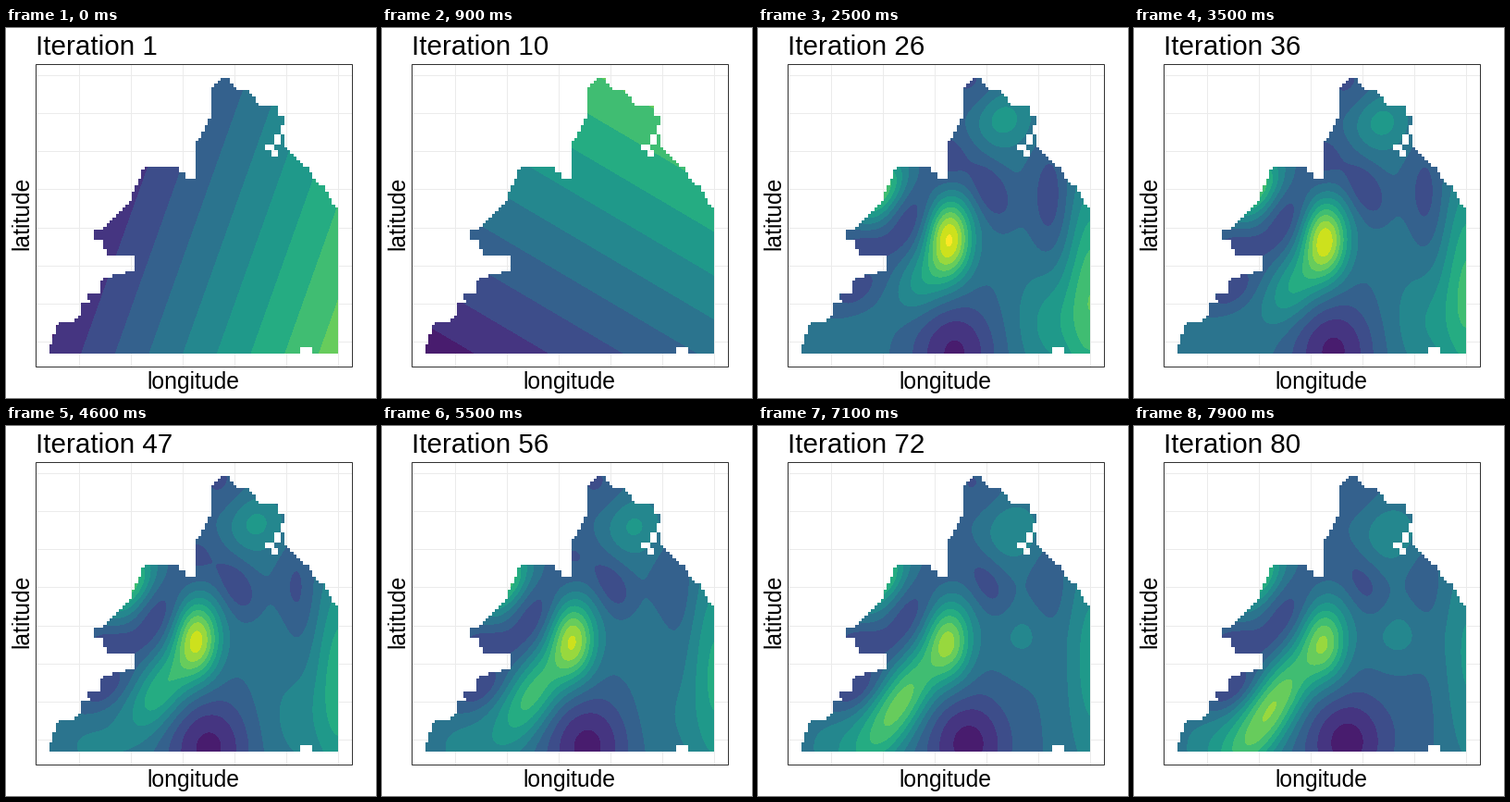
Animation of 400x400 px, one loop 8000 ms. Source, as a matplotlib script:

```python
import numpy as np
import matplotlib.pyplot as plt
from matplotlib.animation import FuncAnimation
from matplotlib.patches import Rectangle
from matplotlib.path import Path

plt.rcParams["font.family"] = ["Liberation Sans", "DejaVu Sans"]

SIZE, DPI, FRAMES = 400, 100, 80
PX = 72 / DPI
LEFT, BOTTOM, CELL = 46.8, 352, 3.43
COLORS = (plt.get_cmap("viridis")(np.linspace(0, 1, 14)) * 255).round().astype(np.uint8)

# Corners of the coast; the raster below turns them into steps.
COAST = [(233, 54), (223, 66), (223, 93), (212, 115), (206, 122), (203, 163),
         (196, 163), (196, 157), (186, 157), (186, 150), (150, 150), (134, 187),
         (119, 202), (105, 217), (95, 217), (95, 227), (103, 228), (109, 244),
         (139, 244), (139, 262), (121, 266), (102, 272), (102, 285), (88, 289),
         (91, 297), (81, 296), (81, 310), (73, 316), (57, 316), (47, 345),
         (47, 353), (318, 353), (318, 346), (331, 346), (331, 353), (360, 353),
         (360, 200), (344, 172), (331, 162), (328, 152), (314, 141), (301, 127),
         (298, 109), (301, 97), (294, 95), (294, 86), (276, 86), (260, 64),
         (257, 69), (250, 69), (240, 54)]
LAKES = [(291, 117, 298, 124), (281, 124, 291, 131), (287, 131, 294, 138)]

gx, gy = np.meshgrid(np.arange(SIZE) + 0.5, np.arange(SIZE) + 0.5)


def land_mask():
    cx = LEFT + (np.floor((gx - LEFT) / CELL) + 0.5) * CELL
    cy = BOTTOM - (np.floor((BOTTOM - gy) / CELL) + 0.5) * CELL
    inside = Path(COAST).contains_points(np.c_[cx.ravel(), cy.ravel()]).reshape(gx.shape)
    for x0, y0, x1, y1 in LAKES:
        inside &= ~((cx > x0) & (cx < x1) & (cy > y0) & (cy < y1))
    return inside & (gy < BOTTOM) & (gx < 359)


land = land_mask()
X, Y = gx[land], gy[land]

TILT_START, TILT_END = 0, 9        # the trend plane turns
FORM, SHARP, LAST = 18, 25, 79     # hills form, sharpen, then drift
BASE = 5.1


class Hill:
    """Oval Gaussian that drifts and grows; heights hold at FORM, SHARP and LAST."""

    def __init__(self, heights, size, start, end=None, angle=0, grow=1):
        self.heights, self.size, self.grow = heights, size, grow
        self.start = np.array(start, float)
        self.end = np.array(end or start, float)
        self.c, self.s = np.cos(np.radians(angle)), np.sin(np.radians(angle))

    def __call__(self, i):
        t = (i - FORM) / (LAST - FORM)
        x, y = self.start + t * (self.end - self.start)
        along, across = self.size
        along *= 1 + t * (self.grow - 1)
        u = ((X - x) * self.c + (Y - y) * self.s) / along
        v = ((Y - y) * self.c - (X - x) * self.s) / across
        height = np.interp(i, (FORM, SHARP, LAST), self.heights)
        return height * np.exp(-(u * u + v * v) / 2)


HILLS = [
    Hill((4.8, 7.6, 4.8), (17, 30), (207, 225), (207, 234)),                        # summit
    Hill((4.8, 2.6, 6.0), (25, 19), (185, 268), (150, 304), angle=122, grow=2.2),   # ridge
    Hill((-3.5, -3.3, -3.6), (31, 38), (210, 352), (230, 342)),                     # south basin
    Hill((4.3, 5.0, 4.5), (25, 15), (131, 177), (134, 163), angle=121),             # northwest shore
    Hill((-0.5, -1.9, -1.8), (30, 15), (166, 208), (162, 208), angle=120),          # west trough
    Hill((-1.6, -1.6, -1.8), (22, 14), (112, 234)),                                 # west cape
    Hill((-2.6, -1.6, -2.2), (25, 13), (105, 285), angle=143),                      # southwest shore
    Hill((-0.6, 0.6, 1.6), (30, 30), (90, 345)),                                    # southwest plain
    Hill((-1.8, 0, 0), (12, 25), (258, 255)),                                       # early pit
    Hill((0.9, -2.1, -1.5), (25, 14), (252, 177), (248, 171), angle=63),            # central pit
    Hill((-1.7, -1.6, -0.7), (18, 25), (206, 142)),                                 # neck
    Hill((3.3, 2.5, 1.8), (23, 23), (262, 95), (279, 117)),                         # northeast hill
    Hill((-0.5, -1.4, -1.1), (22, 25), (232, 62)),                                  # north tip
    Hill((-1.0, -1.8, -0.8), (15, 45), (316, 190), (314, 172)),                     # east trough
    Hill((5.4, 4.4, 2.1), (20, 85), (362, 290), (362, 250)),                        # east shore
    Hill((2.6, 2.2, -0.4), (28, 45), (318, 320), (305, 310)),                       # southeast rise
    Hill((0, 0.2, 1.4), (24, 24), (288, 225)),                                      # east hill
]

west_east = 3 + (X - 81 - 0.357 * (352 - Y)) / 36.7
south_north = 2 + (293 - Y + 0.59 * X) / 47.4


def terrain(i):
    return BASE + sum(hill(i) for hill in HILLS)


def mix(a, b, t):
    return a + t * (b - a)


def surface(i):
    if i <= TILT_END:
        return mix(west_east, south_north, (i - TILT_START) / (TILT_END - TILT_START))
    if i < FORM:
        return mix(south_north, terrain(FORM), (i - TILT_END) / (FORM - TILT_END))
    return terrain(i)


def paint(i):
    rgba = np.zeros((SIZE, SIZE, 4), np.uint8)
    rgba[land] = COLORS[np.clip(np.floor(surface(i)), 0, 13).astype(int)]
    return rgba


fig = plt.figure(figsize=(SIZE / DPI, SIZE / DPI), dpi=DPI, facecolor="white")
ax = fig.add_axes([0, 0, 1, 1])
ax.axis("off")

grid = dict(color="#ebebeb", lw=PX, zorder=1, snap=False)
for k in range(6):
    ax.plot([79.5 + 56 * k] * 2, [40, 367], **grid)
for k in range(8):
    ax.plot([33, 374], [np.floor(51.2 + 41.2 * k) + 0.5] * 2, **grid)

picture = ax.imshow(paint(0), extent=(0, SIZE, SIZE, 0), interpolation="nearest",
                    aspect="auto", zorder=2)
ax.add_patch(Rectangle((32.5, 39.5), 342, 327, fill=False, ec="#333333", lw=PX,
                       zorder=3, snap=False))
title = ax.text(31.5, 29, "Iteration 1", fontsize=29.6 * PX, va="baseline")
label = dict(fontsize=24.7 * PX, ha="center", va="baseline", rotation_mode="anchor")
ax.text(202, 390, "longitude", **label)
ax.text(24, 200, "latitude", rotation=90, **label)
ax.set_xlim(0, SIZE)
ax.set_ylim(SIZE, 0)


def update(i):
    picture.set_data(paint(i))
    title.set_text(f"Iteration {i + 1}")
    return picture, title


anim = FuncAnimation(fig, update, frames=FRAMES, interval=100,
                     init_func=lambda: update(0), repeat=True)
plt.show()
```
